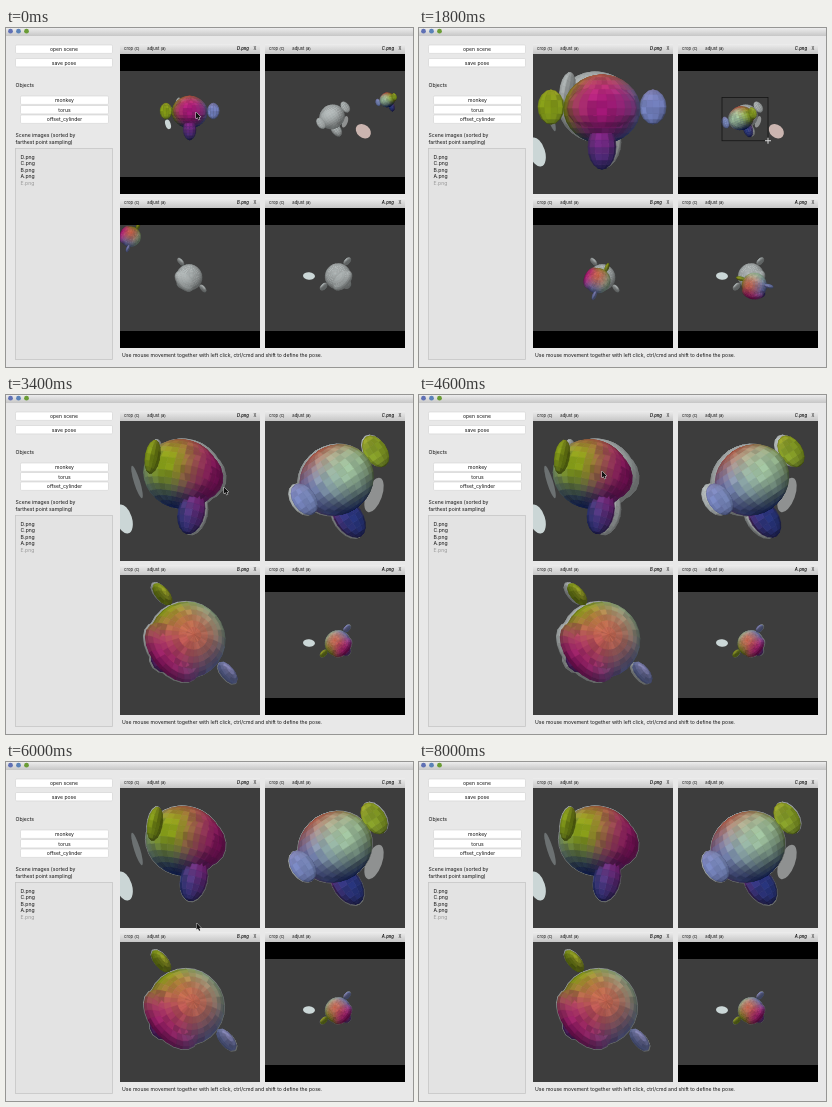
Recreate the animation shown at these times as an HTML page with a canvas. Size 407 by 339 pixels, loop 8200 ms.

```html
<!DOCTYPE html>
<html lang="en">
<head>
<meta charset="utf-8">
<title>Pose tool</title>
<style>
  html, body { margin: 0; width: 100%; height: 100%; overflow: hidden; background: #e8e8e8; }
  svg, canvas { position: absolute; left: 0; top: 0; width: 407px; height: 339px; }
  text { font: 5.1px Inter, "Open Sans", sans-serif; fill: #111; }
  .bar { font-size: 4.2px; }
  .name { font-weight: 600; font-style: italic; text-anchor: end; }
  .mid { text-anchor: middle; }
  .off { fill: #999; }
</style>
</head>
<body>
<svg id="ui" viewBox="0 0 407 339">
  <defs>
    <linearGradient id="bar" x2="0" y2="1"><stop stop-color="#ededed"/><stop offset="1" stop-color="#c6c6c6"/></linearGradient>
  </defs>
  <rect width="407" height="339" fill="#e8e8e8"/>
  <rect width="407" height="8" fill="url(#bar)"/>
  <circle cx="4.5" cy="3.2" r="2.4" fill="#5f70b4"/>
  <circle cx="12.5" cy="3.2" r="2.4" fill="#5a82b8"/>
  <circle cx="20.5" cy="3.2" r="2.4" fill="#6a9c35"/>
  <rect x="9.5" y="120.5" width="97" height="211" fill="#e3e3e3" stroke="#c6c6c6" stroke-width=".8"/>
</svg>
<canvas id="stage"></canvas>
<script>
const LOOP = 8200, STEP = 200, SIZE = 140, ZOOM = 3, BOX = 46;
const ui = document.getElementById('ui');
const canvas = document.getElementById('stage');
const ctx = canvas.getContext('2d');
const dpr = window.devicePixelRatio || 1;
canvas.width = 407 * dpr;
canvas.height = 339 * dpr;
ctx.scale(dpr, dpr);

// Each panel: real head centre (cropped view), screen directions of the head's
// x and z axes, start offset and scale of the overlay, later drift and sway.
const panels = [
  { name: 'D', x: 114, y: 26, crop: [184, 87], cropAt: 1400, centre: [178, 79],
    right: [.4, -.28, -.87], face: [.89, -.1, .44], start: [0, 6, 1.39], drift: [5, 2], sway: -6,
    extras: [[118, 124, 8, 15, -.3, '#cbd6d6'], [131, 87, 3, 17, -.3, '#6c7172']] },
  { name: 'C', x: 259, y: 26, crop: [326, 92.5], cropAt: 2000, centre: [329, 85],
    right: [-.7, -.47, .54], face: [-.45, -.3, -.84], start: [178, -55, .6], drift: [-12, 4], sway: 4,
    extras: [[423, 128, 25, 19, .7, '#cbb5b0'], [368, 100, 8, 18, .35, '#8f9191']] },
  { name: 'B', x: 114, y: 180, crop: [184.5, 251], cropAt: 2400, centre: [180, 245],
    right: [.64, -.77, 0], face: [-.75, -.62, .25], start: [-162, -132, .8], drift: [-14, 10], sway: 3,
    extras: [] },
  { name: 'A', x: 259, y: 180, crop: [329, 250], cropAt: Infinity, centre: [338, 245],
    right: [.68, .73, 0], face: [.68, -.63, .37], start: [240, -180, .7], drift: [10, 28], sway: -2,
    extras: [[251, 244, 18, 11, .1, '#cbd7d7']] }
];

// ---------- static window ----------
function add(tag, attrs, content = '') {
  const el = document.createElementNS('http://www.w3.org/2000/svg', tag);
  for (const k in attrs) el.setAttribute(k, attrs[k]);
  el.textContent = content;
  ui.append(el);
}
const label = (s, x, y, cls = '') => add('text', { x, y, class: cls }, s);
function button(s, x, y, w) {
  add('rect', { x, y, width: w, height: 8.4, rx: 1.2, fill: '#fff', stroke: '#c8c8c8', 'stroke-width': .5 });
  label(s, x + w / 2, y + 6, 'mid');
}
button('open scene', 9.5, 17, 97);
button('save pose', 9.5, 30.5, 97);
['monkey', 'torus', 'offset_cylinder'].forEach((s, i) => button(s, 14.5, 68 + i * 9.5, 88));
label('Objects', 9.5, 59);
label('Scene images (sorted by', 9.5, 109);
label('farthest point sampling)', 9.5, 116);
[...'DCBAE'].forEach((c, i) => label(c + '.png', 14.5, 130.5 + i * 6.5, i < 4 ? '' : 'off'));
label('Use mouse movement together with left click, ctrl/cmd and shift to define the pose.', 116, 328.5);
for (const { name, x, y } of panels) {
  const base = y - 3.6;
  add('rect', { x, y: y - 10, width: SIZE, height: 10, fill: 'url(#bar)' });
  label('crop (c)', x + 4, base, 'bar');
  label('adjust (a)', x + 27.3, base, 'bar');
  label(name + '.png', x + 129, base, 'bar name');
  label('X', x + 133.5, base, 'bar');
}

// ---------- vectors and time ----------
const dot = (a, b) => a[0] * b[0] + a[1] * b[1] + a[2] * b[2];
const cross = (a, b) => [a[1] * b[2] - a[2] * b[1], a[2] * b[0] - a[0] * b[2], a[0] * b[1] - a[1] * b[0]];
const unit = a => a.map(v => v / Math.hypot(...a));
const ramp = (t, a, b) => Math.min(1, Math.max(0, (t - a) / (b - a)));
const rnd = i => { const v = Math.sin(i * 12.9898) * 43758.5453; return v - Math.floor(v); };

function spin(v, axis, a) {
  const c = Math.cos(a), s = Math.sin(a), w = cross(axis, v), d = dot(axis, v) * (1 - c);
  return v.map((n, i) => n * c + w[i] * s + axis[i] * d);
}

// ---------- head mesh ----------
// ellipsoids: centre, radii, columns, rows (x right, y up, z towards the face)
const solids = [
  [[0, 0, 0], [38, 34, 38], 28, 16],
  [[0, 1, 20], [35, 23, 20], 22, 10],
  [[0, -38, 20], [14, 22, 13], 12, 10],
  [[-51, 2, -10], [13, 17, 5], 12, 8],
  [[51, 2, -10], [13, 17, 5], 12, 8]
];
// colours towards -x, +x, -y, +y, -z, +z
const hues = [[140, 165, 22], [122, 136, 205], [38, 60, 140], [200, 104, 82], [168, 205, 168], [176, 26, 128]];

function hueAt([x, y, z]) {
  const d = [x / 50, y / 45, z / 38];
  const w = hues.map((_, i) => Math.max(0, i % 2 ? d[i >> 1] : -d[i >> 1]) ** 2);
  const sum = w.reduce((a, b) => a + b);
  return [0, 1, 2].map(c => hues.reduce((s, h, i) => s + h[c] * w[i] / sum, 0));
}

const faces = [];
for (const [c, r, cols, rows] of solids) {
  const on = (i, j) => {
    const a = i / cols * 2 * Math.PI, b = j / rows * Math.PI;
    return [Math.sin(b) * Math.cos(a), Math.cos(b), Math.sin(b) * Math.sin(a)];
  };
  const place = u => u.map((v, k) => c[k] + v * r[k]);
  for (let j = 0; j < rows; j++) for (let i = 0; i < cols; i++) {
    const u = on(i + .5, j + .5), mid = place(u);
    const tone = .91 + .18 * rnd(faces.length + 1);
    faces.push({
      mid, normal: unit(u.map((v, k) => v / r[k])), hue: hueAt(mid).map(v => v * tone),
      corners: [on(i, j), on(i + 1, j), on(i + 1, j + 1), on(i, j + 1)].map(place)
    });
  }
}

// ---------- drawing ----------
const LIGHT = unit([-.2, .5, .8]);
const AXIS = unit([-.06, .958, -.267]), TURN = 1.164;

function drawHead({ right, face }, x, y, scale, angle, tinted) {
  const x3 = unit(right), y3 = unit(cross(face, right)), z3 = cross(x3, y3);
  const basis = [[1, 0, 0], [0, 1, 0], [0, 0, 1]].map(e => {
    const p = spin(e, AXIS, angle);
    return [0, 1, 2].map(k => p[0] * x3[k] + p[1] * y3[k] + p[2] * z3[k]);
  });
  const view = p => [0, 1, 2].map(k => p[0] * basis[0][k] + p[1] * basis[1][k] + p[2] * basis[2][k]);
  ctx.lineWidth = .6;
  faces.map(f => ({ f, n: view(f.normal), depth: view(f.mid)[2] }))
    .filter(o => o.n[2] > -.15)
    .sort((a, b) => a.depth - b.depth)
    .forEach(({ f, n }) => {
      const lit = Math.max(0, dot(n, LIGHT));
      const rgb = tinted ? f.hue.map(v => v * (.5 + .5 * lit)) : [205, 212, 212].map(v => v * (.5 + .4 * lit));
      ctx.fillStyle = ctx.strokeStyle = `rgb(${rgb.map(Math.round)})`;
      ctx.beginPath();
      f.corners.map(view).forEach(p => ctx.lineTo(x + p[0] * scale, y - p[1] * scale));
      ctx.closePath();
      ctx.fill();
      ctx.stroke();
    });
}

function drawPanel(panel, t) {
  const { x, y, crop, cropAt, centre, start, drift, sway, extras } = panel;
  const cropped = t >= cropAt;
  ctx.save();
  ctx.fillStyle = '#000';
  ctx.fillRect(x, y, SIZE, SIZE);
  ctx.beginPath();
  ctx.rect(x, cropped ? y : y + 17, SIZE, cropped ? SIZE : 106);
  ctx.clip();
  ctx.fillStyle = '#3d3d3d';
  ctx.fillRect(x, y, SIZE, SIZE);
  if (!cropped) {
    ctx.translate(...crop);
    ctx.scale(1 / ZOOM, 1 / ZOOM);
    ctx.translate(-x - SIZE / 2, -y - SIZE / 2);
  }
  for (const [cx, cy, rx, ry, tilt, color] of extras) {
    ctx.beginPath();
    ctx.ellipse(cx, cy, rx, ry, tilt, 0, 7);
    ctx.fillStyle = color;
    ctx.fill();
  }
  drawHead(panel, ...centre, 1.02, 0, false);

  const far = 1 - ramp(t, 200, 1000);
  const left = 1 - ramp(t, 2200, 3400);
  const swing = sway * Math.sin(Math.PI * ramp(t, 3000, 6000));
  drawHead(panel,
    centre[0] + start[0] * far + drift[0] * left + swing,
    centre[1] + start[1] * far + drift[1] * left,
    1 + (start[2] - 1) * far, -TURN * left, true);
  ctx.restore();
}

// pointer between crops: time, x, y
const stops = [[0, 190, 84], [1000, 161, 64], [2400, 207, 273], [2600, 242.5, 83], [3400, 218, 92], [4600, 183, 76], [6000, 190.5, 161], [7200, 190, 165]];

function drawPointer(t) {
  const next = stops.findIndex(s => s[0] > t);
  if (next < 0) return;
  const a = stops[next - 1], b = stops[next], k = ramp(t, a[0], b[0]);
  const cropping = panels.find(p => t >= p.cropAt - 400 && t < p.cropAt);
  ctx.save();
  if (cropping) {
    const [cx, cy] = cropping.crop, w = BOX * ramp(t, cropping.cropAt - 400, cropping.cropAt - 200);
    ctx.translate(cx - BOX / 2, cy - BOX / 2);
    ctx.strokeStyle = '#151515';
    ctx.lineWidth = .8;
    ctx.strokeRect(0, 0, w, w * .94);
    ctx.translate(w, w * .94);
    ctx.strokeStyle = '#ddd';
    ctx.lineWidth = 1;
    ctx.stroke(new Path2D('M-3 0H3M0 -3V3'));
  } else if (t < 1400 || t >= 2400) {
    ctx.translate(a[1] + (b[1] - a[1]) * k, a[2] + (b[2] - a[2]) * k);
    const arrow = new Path2D('M0 0V6.6L1.5 5.3L2.6 7.8L3.7 7.3L2.6 4.9H4.6Z');
    ctx.strokeStyle = '#ddd';
    ctx.lineWidth = 1;
    ctx.stroke(arrow);
    ctx.fillStyle = '#111';
    ctx.fill(arrow);
  }
  ctx.restore();
}

let shown = -1;
function frame(now) {
  const t = Math.floor(now % LOOP / STEP) * STEP;
  if (t !== shown) {
    shown = t;
    ctx.clearRect(0, 0, 407, 339);
    panels.forEach(p => drawPanel(p, t));
    drawPointer(t);
  }
  requestAnimationFrame(frame);
}
requestAnimationFrame(frame);
</script>
</body>
</html>
```
